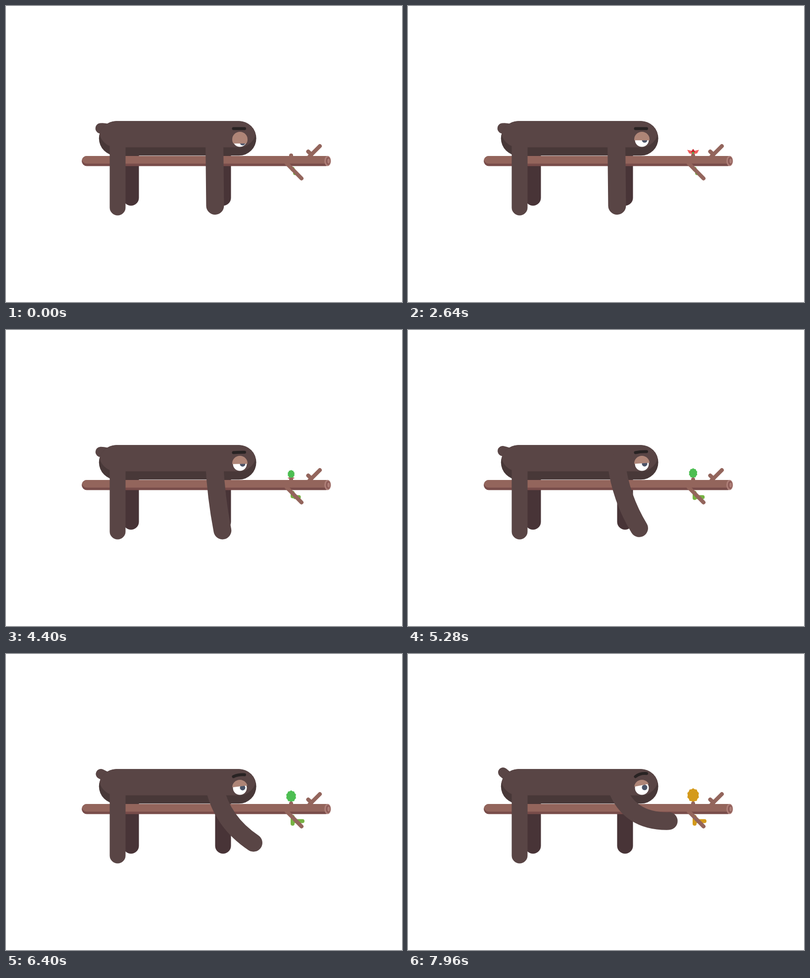
Recreate the animation shown at these times as an HTML page with a canvas. Size 800 px wide and 600 px high, loop 8 s.

```html
<!DOCTYPE html>
<html lang="en">
<head>
<meta charset="utf-8">
<title>Sloth on a branch</title>
<style>
html, body { margin: 0; width: 100%; height: 100%; overflow: hidden; background: #fff; }
canvas { display: block; }
</style>
</head>
<body>
<canvas id="stage" width="800" height="600"></canvas>
<script>
const ctx = document.getElementById('stage').getContext('2d');
const LOOP = 8000;
const FUR = '#594545', FUR_DARK = '#483838', FUR_BACK = '#483437';
const BARK = '#93655c', BARK_DARK = '#784c4a', BARK_LIGHT = '#ae7f78';
const GREEN = [77, 190, 82], LIME = [118, 178, 67], AMBER = [212, 154, 27];
const PINK = [240, 96, 95], DULL = [176, 82, 72];

const ramp = (t, start, end) => Math.min(1, Math.max(0, (t - start) / (end - start)));
const mix = (a, b, k) => `rgb(${a.map((v, i) => Math.round(v + (b[i] - v) * k))})`;
const radians = degrees => degrees * Math.PI / 180;

function stroke(color, width, x1, y1, x2, y2, bendX = (x1 + x2) / 2, bendY = (y1 + y2) / 2) {
  ctx.strokeStyle = color;
  ctx.lineWidth = width;
  ctx.lineCap = 'round';
  ctx.beginPath();
  ctx.moveTo(x1, y1);
  ctx.quadraticCurveTo(bendX, bendY, x2, y2);
  ctx.stroke();
}

function ellipse(color, x, y, rx, ry = rx) {
  ctx.fillStyle = color;
  ctx.beginPath();
  ctx.ellipse(x, y, rx, ry, 0, 0, 2 * Math.PI);
  ctx.fill();
}

function polygon(color, points) {
  ctx.fillStyle = color;
  ctx.beginPath();
  points.forEach(p => ctx.lineTo(...p));
  ctx.fill();
}

// Pill with a shaded underside.
function pill(x, y, w, h, shade, light, dark) {
  const shape = new Path2D();
  shape.roundRect(x, y, w, h, h / 2);
  ctx.fillStyle = dark;
  ctx.fill(shape);
  ctx.save();
  ctx.clip(shape);
  ctx.translate(0, -shade);
  ctx.fillStyle = light;
  ctx.fill(shape);
  ctx.restore();
}

function drawBranch() {
  pill(153, 304, 503, 20.4, 4.8, BARK, BARK_DARK);
  ellipse(BARK_LIGHT, 649.8, 314.2, 6.6, 10.4);
  ellipse('#8b5a56', 650.8, 314.2, 4.6, 8);
  ellipse(BARK_LIGHT, 651.8, 314.2, 2.5, 5);
}

function drawTwigs(t, autumn) {
  const grow = ramp(t, 2840, 6160), lime = mix(LIME, AMBER, autumn);
  stroke(lime, 8, 584, 338.8, 585 + 14 * grow, 338.8);
  stroke(lime, 8, 579, 330, 579, 331 + 13 * grow);
  stroke(BARK, 8, 567, 319, 597, 349.5);
  stroke(BARK, 8, 613, 305, 634, 284);
  stroke(BARK, 8, 610.5, 295, 617, 301);
}

function petal(color, length, width, degrees) {
  ctx.save();
  ctx.translate(576, 300.5);
  ctx.rotate(radians(degrees));
  polygon(color, [[0, 0], [-width / 2, -length / 2], [0, -length], [width / 2, -length / 2]]);
  ctx.restore();
}

function drawFlower(t) {
  const bloom = ramp(t, 2000, 2320), open = ramp(t, 2320, 2640);
  const wilt = ramp(t, 2640, 4400), fade = ramp(t, 4400, 6000);
  const length = 18 * bloom - 3 * open - 7.5 * (wilt + fade);
  const width = 6 * bloom + open - 4.6 * wilt - 2.4 * fade;
  const spread = 15 + 38 * open + 34 * wilt;
  const middle = 18 * bloom - 7 * open - 11 * ramp(t, 2640, 3200);
  for (const side of [-1, 1]) petal(mix(PINK, DULL, wilt), length, width, side * spread);
  petal('#c1272d', middle, Math.min(8, middle), 0);
}

function drawLeaf(t, autumn) {
  const teeth = 10, rx = 12.3 * Math.sqrt(ramp(t, 2480, 7960)), ry = 1.16 * rx;
  polygon(mix(GREEN, AMBER, autumn), Array.from({ length: 2 * teeth }, (_, i) => {
    const a = i / teeth * Math.PI, r = i % 2 ? .88 : 1;
    return [576 + rx * r * Math.sin(a), 300.5 - ry - ry * r * Math.cos(a)];
  }));
  stroke(BARK, 8, 576, 303, 576, 307);
}

function drawTail(reach) {
  stroke(FUR, 21 - reach, 191 + reach, 248 - 8 * reach, 216, 253 + 4 * reach,
    201 + reach, 246.5 + 2.5 * reach);
}

// The arm swings from the shoulder while it bows out below its chord.
function drawArm(reach) {
  const x = 421, y = 270;
  const angle = radians(.6 + 56.4 * reach), sin = Math.sin(angle), cos = Math.cos(angle);
  const chord = 135 + 25 * reach - 34 * reach ** 2;
  const along = chord / 2 - 3 * reach, bow = 45 * reach;
  stroke(FUR, 36, x, y, x + chord * sin, y + chord * cos,
    x + along * sin - bow * cos, y + along * cos + bow * sin);
}

function drawEye(closed, reach) {
  const lid = 272.2 + 6.5 * closed;
  ellipse('#fff', 472.5, 271.6, 14);
  ellipse('#4b5468', 478, 271.5 + 5.5 * closed - reach, 5.5);
  ctx.save();
  ctx.beginPath();
  ctx.arc(472.5, 270.5, 15.5, 0, 2 * Math.PI);
  ctx.clip();
  polygon('#ae8577', [[457, 250], [488, 250], [488, lid - 9.2 * reach], [457, lid - 3.2 * reach]]);
  ctx.restore();
  stroke('#282323', 6, 459.5, 248.5, 482, 248.5 - 6.2 * reach, 470.5 - 1.5 * reach, 248.5 - 7.5 * reach);
}

function draw(t) {
  const closed = 1 - ramp(t, 160, 1280) ** 3;
  const reach = ramp(t, 3960, 7960);
  const autumn = ramp(t, 7200, 7920);

  ctx.fillStyle = '#fff';
  ctx.fillRect(0, 0, 800, 600);
  for (const x of [252.5, 438.5]) stroke(FUR_BACK, 32, x, 300, x, 388.7);
  drawBranch();
  drawTwigs(t, autumn);
  drawFlower(t);
  drawLeaf(t, autumn);

  drawTail(reach);
  pill(187.8, 233.3, 317.8, 70, 16.7, FUR, FUR_DARK);
  stroke(FUR, 32, 225.5, 265, 225.5, 408.5);
  drawArm(reach);
  drawEye(closed, reach);
}

function frame() {
  draw(performance.now() % LOOP);
  requestAnimationFrame(frame);
}
frame();
</script>
</body>
</html>
```
